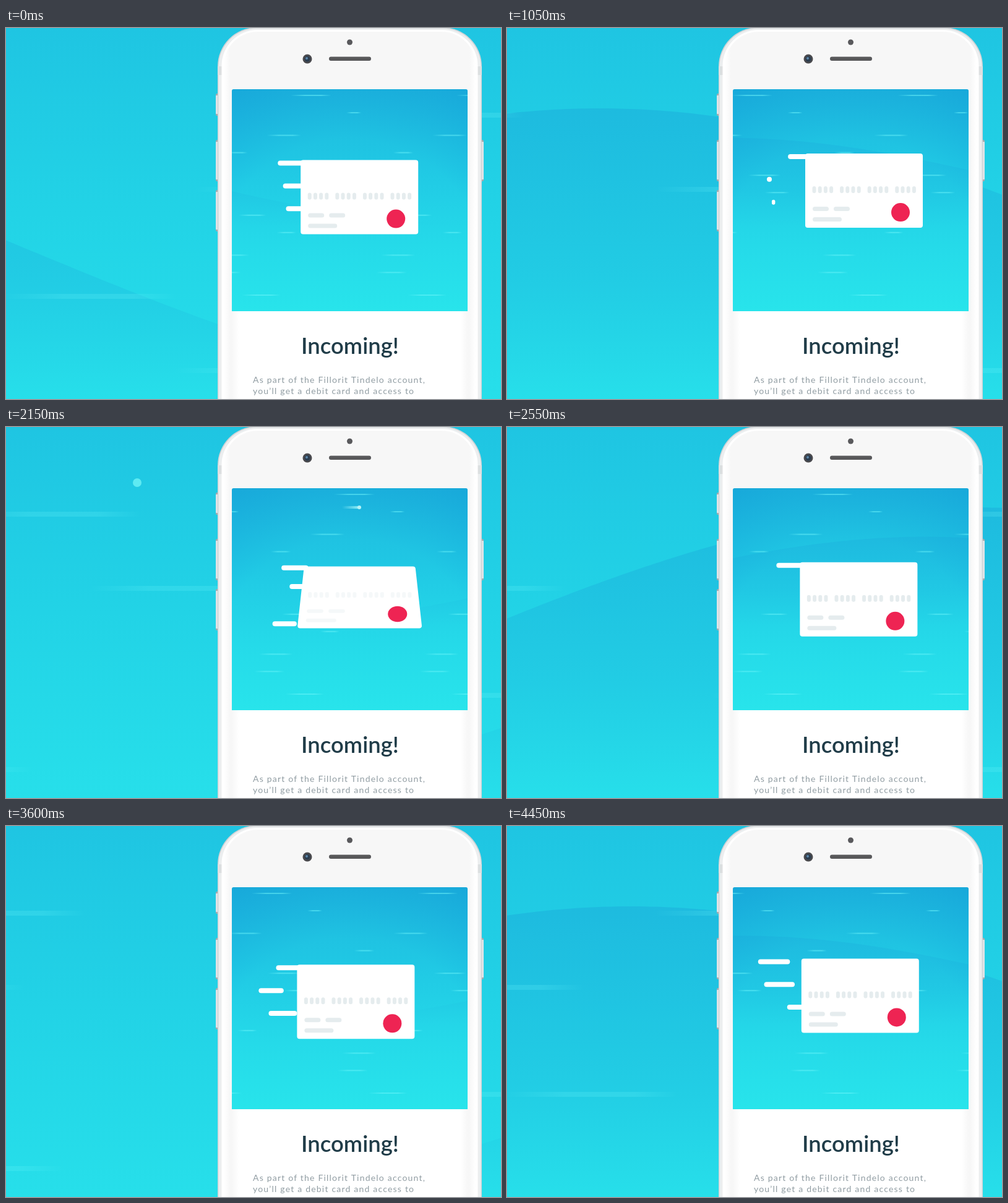
Animation of 800 by 600 pixels, one loop 4.5 s. Source, as an HTML page with a canvas:

```html
<!DOCTYPE html>
<html lang="en">
<head>
<meta charset="utf-8">
<title>Incoming card</title>
<style>
  html, body { margin: 0; width: 100%; height: 100%; overflow: hidden; background: #23d2e6; }
  canvas, svg { position: absolute; left: 0; top: 0; width: 800px; height: 600px; }
  text { font-family: Lato, "Open Sans", sans-serif; }
  .title { font-size: 36.5px; font-weight: 600; fill: #203c48; text-anchor: middle; }
  .body { font-size: 14px; letter-spacing: 1.2px; fill: #919da3; }
</style>
</head>
<body>
<canvas id="stage" width="800" height="600"></canvas>
<svg viewBox="0 0 800 600">
  <text class="title" x="556" y="527">Incoming!</text>
  <g class="body">
    <text x="399" y="574">As part of the Fillorit Tindelo account,</text>
    <text x="399" y="592">you’ll get a debit card and access to</text>
    <text x="399" y="610">a range of fine perks.</text>
  </g>
</svg>
<script>
const ctx = document.getElementById('stage').getContext('2d');
const LOOP = 4500, STEP = 50, TAU = Math.PI * 2;
const clamp = (v, lo, hi) => Math.min(hi, Math.max(lo, v));
const mod = (v, n) => ((v % n) + n) % n;
const random = seed => mod(Math.sin(seed * 12.9898) * 43758.5453, 1);

function linear(x0, y0, x1, y1, stops) {
  const g = ctx.createLinearGradient(x0, y0, x1, y1);
  stops.forEach(([p, c]) => g.addColorStop(p, c));
  return g;
}
function box(x, y, w, h, r, fill) {
  ctx.beginPath();
  ctx.roundRect(x, y, w, h, r);
  ctx.fillStyle = fill;
  ctx.fill();
}
function disc(x, y, r, fill) {
  ctx.beginPath();
  ctx.arc(x, y, r, 0, TAU);
  ctx.fillStyle = fill;
  ctx.fill();
}
// A line of light that fades out at both ends
function glow(x, y, w, h, alpha) {
  const c = a => `rgba(110,245,250,${a})`;
  ctx.fillStyle = linear(x, 0, x + w, 0, [[0, c(0)], [.35, c(alpha)], [.75, c(alpha)], [1, c(0)]]);
  ctx.fillRect(x, y - h / 2, w, h);
}

// Hills rolling left: [time, crest x, px per ms]
const hills = [[0, -835, 2.25], [550, 1310, 2.32], [2150, 2000, 3.12], [4450, 200, 2.18]];
function drawHills(t) {
  ctx.beginPath();
  ctx.moveTo(0, 600);
  for (let x = 0; x <= 904; x += 8) {
    const ys = hills.map(([t0, x0, v]) => {
      const crest = x0 - v * (t - t0);
      return 360 - 230 * Math.cos(clamp((x - crest) / 3500 * TAU, -Math.PI, Math.PI));
    });
    ctx.lineTo(x, Math.min(...ys));
  }
  ctx.lineTo(904, 600);
  ctx.fillStyle = linear(0, 130, 0, 600,
    [[0, 'rgba(24,150,212,.3)'], [.6, 'rgba(24,150,212,.17)'], [1, 'rgba(24,150,212,0)']]);
  ctx.fill();
}

// Wide wind streaks: [y, start x, distance between repeats]
const streaks = [[141, 588, 1070], [261, 305, 775], [434, -5, 1187], [554, 272, 1211]];

// Thin wind lines: rows in pairs, alternately long and short, repeated every 268 px
function drawLines(t) {
  for (let row = 0; row < 11; row++) {
    const odd = row % 2;
    const y = 109 + (row - odd) / 2 * 64.6 + odd * 28;
    const len = (odd ? 22 : 40) + 28 * random(row + 1);
    const start = mod(268 * random(row + 40) - .092 * t, 268);
    for (let x = 300 + start - 268; x < 746; x += 268) glow(x, y, len, 2, .5);
  }
}

// A short-lived spark with a trail
function drawSpark(x, y, r, trail, age) {
  if (Math.abs(age) > 100) return;
  ctx.globalAlpha = 1 - Math.abs(age) / 150;
  x += age * .1;
  ctx.fillStyle = linear(x - trail, 0, x, 0, [[0, 'rgba(170,250,252,0)'], [1, 'rgba(170,250,252,.8)']]);
  ctx.fillRect(x - trail, y - r * .7, trail, r * 1.4);
  disc(x, y, r, trail ? '#b5f3f7' : '#5eeaf2');
  ctx.globalAlpha = 1;
}

// The card bobs once per loop and flips over once
function cardPose(t) {
  const bob = Math.cos((t - 3350) / LOOP * TAU);
  const p = clamp((t - 1300) / 1065, 0, 1);
  return { x: 571 - 6 * bob, y: 274 + 11 * bob, tilt: Math.PI * (1 - Math.cos(Math.PI * p)) };
}

// Speed bars slide out from behind the card: [first time, interval] per lane
const lanes = [[29, 365], [56, 437], [56, 443], [260, 625]];
function drawBars(t, card) {
  const edge = card.x - 95;
  lanes.forEach(([first, every], i) => {
    const y = card.y + (36.8 * i - 55) * Math.cos(card.tilt);
    const reach = 8 * i - 70;
    for (let n = 0; first + n * every < LOOP + 300; n++) {
      const tail = -.45 * (t - first - n * every);
      const head = Math.max(tail - 50 + 7 * i - 20 * random(n + i * 9), reach);
      const end = Math.min(tail, 12);
      if (head < 0 && end - head > 3) box(edge + head, y - 4, end - head, 8, 4, '#fff');
    }
  });
}

function drawCard({ x, y, tilt }) {
  const sin = Math.sin(tilt), cos = Math.cos(tilt);
  const project = (px, py) => {
    const s = 580 / (580 + py * sin);
    return { x: x + px * s, y: y + py * cos * s, s };
  };
  ctx.beginPath();
  for (const [px, py] of [[-91, -56], [91, -56], [91, 56], [-91, 56]]) {
    const corner = project(px, py);
    ctx.lineTo(corner.x, corner.y);
  }
  ctx.closePath();
  ctx.fillStyle = ctx.strokeStyle = '#fff';
  ctx.lineWidth = 8;
  ctx.lineJoin = 'round';
  ctx.fill();
  ctx.stroke();
  if (cos <= 0) return;

  const place = (px, py, draw) => {
    const p = project(px, py);
    ctx.save();
    ctx.translate(p.x, p.y);
    ctx.scale(p.s, p.s * cos);
    draw();
    ctx.restore();
  };
  const pill = (px, py, w, h) => place(px, py, () => box(-w / 2, -h / 2, w, h, Math.min(w, h) / 2, '#e5ecee'));
  ctx.globalAlpha = clamp(1 + sin * 1.1, 0, 1);
  for (let i = 0; i < 16; i++) pill(-80.5 + (i >> 2) * 44.6 + (i & 3) * 9.2, -1.5, 6, 11);
  pill(-70, 29.5, 26, 7);
  pill(-36, 29.5, 26, 7);
  pill(-59.5, 46.5, 47, 7);
  ctx.globalAlpha = 1;
  place(59, 35, () => disc(0, 0, 15, '#ee2453'));
}

// A cloud rushing past, smeared sideways
function drawCloud(t) {
  const x = 570 - 2 * (t - 3950);
  if (x < 200 || x > 900) return;
  ctx.globalAlpha = .09;
  for (let d = -28; d <= 28; d += 1.4) {
    const cx = x + d;
    ctx.beginPath();
    for (const [dx, cy, r] of [[0, 141, 34], [-44, 180, 42], [54, 185, 54], [-85, 210, 30]]) {
      ctx.moveTo(cx + dx + r, cy);
      ctx.arc(cx + dx, cy, r, 0, TAU);
    }
    ctx.rect(cx - 85, 190, 139, 49);
    ctx.fillStyle = '#fff';
    ctx.fill();
  }
  ctx.globalAlpha = 1;
}

function drawBackground(t) {
  ctx.fillStyle = linear(0, 0, 0, 600, [[0, '#1fc5e2'], [.5, '#22d3e6'], [1, '#27dfea']]);
  ctx.fillRect(0, 0, 800, 600);
  drawHills(t);
  for (const [y, x, gap] of streaks) glow(mod(x - .8 * t + 300, gap) - 300, y, 280, 8, .2);
  drawSpark(212, 90, 7, 0, t - 2150);
}

function drawButton(x, y, h) {
  box(x, y, 5, h, 2, '#a3abb0');
  box(x, y + 3, 5, h - 6, 1, '#dfe3e6');
}

function drawPhone() {
  drawButton(339, 106, 36);
  drawButton(339, 181, 67);
  drawButton(339, 262, 67);
  drawButton(767, 181, 67);
  box(342, -1, 427, 720, 63, '#cfd4d7');
  box(343.5, .5, 424, 720, 62, '#eceeef');
  for (const x of [342, 762]) {
    ctx.fillStyle = '#dcdfe0';
    ctx.fillRect(x, 62, 7, 14);
  }
  box(348.5, 3, 414, 720, 58, '#fff');
  box(352, 6, 407, 720, 55, linear(352, 0, 759, 0,
    [[0, '#fff'], [.025, '#f7f7f7'], [.975, '#f7f7f7'], [1, '#fff']]));
  disc(555.5, 23, 4.5, '#59595c');
  box(522, 46.5, 68, 6.5, 3.2, '#58585a');
  disc(487, 50, 7.5, '#4a4a4e');
  disc(487, 50, 4.5, '#2b3d50');
  disc(486, 49, 2, '#5d86a8');
  box(365, 99, 381, 510, [3, 3, 0, 0], linear(365, 0, 746, 0,
    [[0, '#f7f7f7'], [.03, '#fff'], [.97, '#fff'], [1, '#f7f7f7']]));
}

function drawScreen(t) {
  ctx.save();
  ctx.beginPath();
  ctx.roundRect(365, 99, 381, 359, [3, 3, 0, 0]);
  ctx.clip();
  ctx.fillStyle = linear(0, 99, 0, 458, [[0, '#1eb8de'], [.35, '#20c8e4'], [.7, '#25dae9'], [1, '#28e4eb']]);
  ctx.fillRect(365, 99, 381, 359);
  const shade = ctx.createRadialGradient(555, 400, 220, 555, 400, 375);
  shade.addColorStop(0, 'rgba(14,145,212,0)');
  shade.addColorStop(1, 'rgba(14,145,212,.45)');
  ctx.fillStyle = shade;
  ctx.fillRect(365, 99, 381, 359);

  ctx.save();
  ctx.transform(.537, 0, 0, .304, 272, 138);
  ctx.globalAlpha = .6;
  drawHills(t);
  ctx.restore();

  drawLines(t);
  drawSpark(427, 369, 3.5, 30, t - 550);
  drawSpark(571, 130, 3, 28, t - 2150);
  const card = cardPose(t);
  drawCloud(t);
  drawBars(t, card);
  drawCard(card);
  ctx.restore();
}

function frame() {
  const t = Math.floor((performance.now() % LOOP) / STEP) * STEP;
  drawBackground(t);
  drawPhone();
  drawScreen(t);
  requestAnimationFrame(frame);
}
frame();
</script>
</body>
</html>
```
